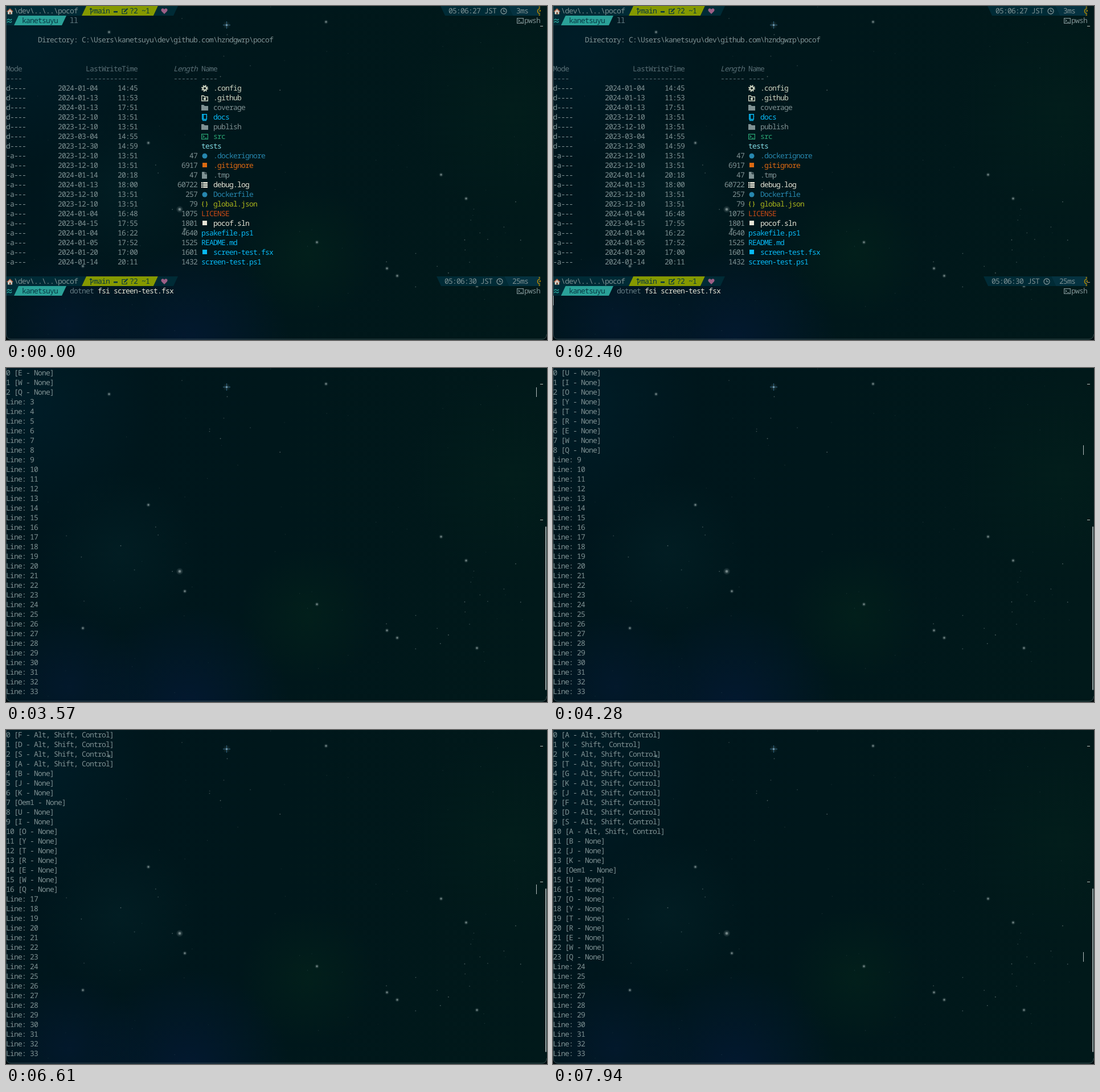
Write an HTML page that moves like this. It is 950x588 px and loops after 8 s.

```html
<!DOCTYPE html>
<html lang="en">
<head>
<meta charset="utf-8">
<title>Terminal key log</title>
<style>
  html, body { margin: 0; width: 100%; height: 100%; overflow: hidden; background: #00151b; }
  svg { display: block; }
  text {
    font: 13px "Noto Sans Mono", "DejaVu Sans Mono", monospace;
    letter-spacing: var(--gap, -.8px);
    text-rendering: geometricPrecision;
    white-space: pre;
  }
  text.slant { font-style: italic; }
</style>
</head>
<body>
<svg id="stage" width="950" height="588" viewBox="0 0 950 588">
  <defs>
    <linearGradient id="sky"><stop stop-color="#00161d"/><stop offset=".5" stop-color="#00171b"/><stop offset="1" stop-color="#01191a"/></linearGradient>
  </defs>
  <rect width="950" height="588" fill="url(#sky)"/>
  <g id="space"></g>
  <g id="list"></g>
  <g id="lines"></g>
  <g id="marks"></g>
  <rect id="bar" x="947" y="279" width="2" height="288" rx="1" fill="#9aa5a5"/>
  <path d="M0 578V588H8Q1 587 0 578M950 578V588H942Q949 587 950 578" fill="#000b0e"/>
  <path d="M.5 0V578Q1 586.5 9 586.5H941Q949 586.5 949.5 578" fill="none" stroke="#5b6a6c" stroke-opacity=".6"/>
  <rect id="caret" width="1" height="17" fill="#b4bebe"/>
  <path id="mouse" d="M1 1V32L8 26 13 37 18 35 13.500 24H24Z" fill="#002b36" stroke="#fff" stroke-width="2"/>
</svg>
<script>
const CELL = 7, ROW = 17, LOOP = 8000;
const DARK = '#073642', SEG = '#002b36', DIM = '#586e75', BACK = '#00171b';
const tint = {
  grey: '#7f9193', pale: '#e6e4d6', sage: '#cfd5c2', cyan: '#08b9f5', blue: '#2787ae',
  green: '#2aa574', aqua: '#83dbe4', orange: '#dc6a12', olive: '#aab41c', red: '#cb4b16'
};
const $ = id => document.getElementById(id);

const text = (col, row, str, fill = tint.grey, extra = '') =>
  `<text x="${col * CELL}" y="${row * ROW + 13}" fill="${fill}" ${extra}>${str}</text>`;
const line = (d, color, width = 1.2) =>
  `<path d="${d}" fill="none" stroke="${color}" stroke-width="${width}"/>`;
const area = (d, color) => `<path d="${d}" fill="${color}"/>`;
const dot = (x, y, r, color, alpha = 1) =>
  `<circle cx="${x}" cy="${y}" r="${r}" fill="${color}" opacity="${alpha}"/>`;
const ring = (r, color, extra) =>
  `<circle cx="6" cy="6" r="${r}" fill="none" stroke="${color}" ${extra}/>`;
const at = (x, y, body) => `<g transform="translate(${x} ${y})">${body}</g>`;

// powerline segment, leaning left (/) or right (\) at each end
const slant = (x0, x1, color, lean = 8, tail = lean) =>
  area(`M${x0 + Math.max(lean, 0)} 0H${x1}L${x1 - tail} 17H${x0 + Math.max(-lean, 0)}Z`, color);

// ---- night sky ----
const glows = [
  [110, 560, 130, '#0b2060', .22], [320, 600, 180, '#081c58', .34],
  [530, 435, 120, '#07351a', .26], [200, 325, 140, '#0a3f44', .16],
  [40, 60, 220, '#002c40', .3], [890, 190, 180, '#06301f', .18]
];
const brightStars = [
  [305, 358], [314, 393], [250, 241], [181, 46], [562, 28], [135, 458],
  [546, 416], [669, 462], [687, 475], [827, 493], [808, 339], [764, 297]
];
const clusters = [[400, 95], [215, 340], [730, 430], [830, 400]];

function drawSpace() {
  let defs = '', out = '', seed = 7;
  const rand = () => (seed = seed * 16807 % 2147483647) / 2147483647;
  const spread = size => (rand() + rand() - 1) * size;
  const glow = (id, color, alpha) =>
    `<radialGradient id="${id}"><stop stop-color="${color}" stop-opacity="${alpha}"/>` +
    `<stop offset="1" stop-color="${color}" stop-opacity="0"/></radialGradient>`;
  glows.forEach(([x, y, r, color, alpha], i) => {
    defs += glow('glow' + i, color, alpha);
    out += dot(x, y, r, `url(#glow${i})`);
  });
  defs += glow('halo', '#a0b2b2', .6);
  for (let i = 0; i < 60; i++)
    out += dot(rand() * 950, rand() * 580, .7, '#6d8688', .12 + rand() * .18);
  for (const [x, y] of clusters)
    for (let i = 0; i < 8; i++)
      out += dot(x + spread(110), y + spread(90), .9, '#93a3a3', .25 + rand() * .25);
  brightStars.forEach(([x, y], i) => {
    const r = i ? 2 : 3.2;
    out += dot(x, y, r * 2, 'url(#halo)', .8) + dot(x, y, r * .7, '#93a3a3', .6);
  });
  out += dot(387.500, 33.500, 7, 'url(#halo)', .4) +
    line('M387.500 27V40M381 33.500H394', '#2b607f', 1) + dot(387.500, 33.500, 1.6, '#7fa5b8');
  $('space').innerHTML = `<defs>${defs}</defs>` + out;
}

// ---- icons, drawn in a 12 x 12 box ----
const icons = {
  gear: c => ring(3.2, c, 'stroke-width="2.2"') + ring(5, c, 'stroke-width="2" stroke-dasharray="2 1.93"'),
  folder: c => area('M0 1H4L6 3H12V11H0Z', c),
  repo: c => line('M.7 2H4L6 4H11.300V11H.7Z', c, 1.4) + dot(6, 7.500, 2.2, c),
  book: c => line('M1.700 .7H9.300V9.500H1.700ZM3.500 1V9M2 11.500H9', c, 1.4),
  term: c => line('M.6 1.600H11.400V10.400H.6ZM2.500 4L5 6 2.500 8M6 8.500H9.500', c),
  disc: c => dot(6, 6, 4.5, c),
  square: c => area('M2 1H10V9H2Z', c),
  file: c => area('M1 0H6V4H10V12H1ZM7 0L10 3H7Z', c),
  log: c => area('M0 1H11V3.700H0ZM0 4.700H11V7.400H0ZM0 8.400H11V11H0Z', c) + line('M2.500 1V11', BACK, .8),
  braces: c => line('M4 1.500Q2 1.500 2.500 4T1 6Q2.500 6 2.500 8T4 10.500M8 1.500Q10 1.500 9.500 4T11 6Q9.500 6 9.500 8T8 10.500', c),
  clock: c => ring(5, c, 'stroke-width="1.3"') + line('M6 3V6.500H9', c),
  house: () => area('M2 6L6 2.500 10 6V11.500H2Z', '#cfc8be') + line('M.7 7L6 2 11.300 7', '#b4593a', 1.5) + area('M5 8H7.500V11.500H5Z', '#7a4a30'),
  heart: c => area('M6 11L1 6Q-.5 3 2 1.500 4.500 .5 6 3 7.500 .5 10 1.500 12.500 3 11 6Z', c),
  edit: c => line('M7 2.500H1V10.500H9V7', c) + line('M4.500 7.500L10.500 1.500', c, 2.2),
  branch: c => line('M2 1V12M2 8Q6 8 6 3M0 3L2 1 4 3', c),
  waves: c => line('M1 5Q3 2 5 4T9 3M1 9Q3 6 5 8T9 7', c, 1.6),
  watch: c => line('M10 1.500A4.500 4.500 0 0 0 10 10.500M7.500 -1H10M7.500 13H10M10 4V6H8.500', c, 1.6)
};
const icon = (name, x, row, color) => at(x, row * ROW + 3, icons[name](color));

// ---- directory listing ----
function prompt(row, clock, took, command) {
  const shift = took.length - 3, x = 763 - shift * CELL;
  const top = slant(-8, 141, SEG) + slant(133, 267, '#859900') + slant(259, 302, SEG) +
    slant(x, x + 119, SEG, -8) + slant(x + 119, 938, '#053240', -8, 0);
  const below = slant(-8, 22, SEG) + slant(14, 106, '#2aa198');
  return at(0, row * ROW, top) + at(0, row * ROW + ROW, below) +
    icon('house', 1, row) + text(2, row, '\\dev\\..\\..\\pocof') +
    icon('branch', 147, row, DARK) + text(22, row, 'main', DARK) +
    at(189, row * ROW + 9, area('M0 0H7V2.500H0Z', DARK)) +
    icon('edit', 203, row, DARK) + text(31, row, '?2 ~1', DARK) +
    icon('heart', 272, row, '#9c5f86') +
    text(111 - shift, row, clock + ' JST') + icon('clock', x + 105, row, tint.grey) +
    text(128 - shift, row, took) + icon('watch', 928, row, '#b58900') +
    icon('waves', 1, row + 1, '#2aa198') + text(4, row + 1, 'kanetsuyu', DARK) +
    command + icon('term', 897, row + 1, tint.grey) + text(130, row + 1, 'pwsh');
}

// date, time, size (- for a directory), name, tint, icon
const files = `
2024-01-04 14:45 - .config sage gear
2024-01-13 11:53 - .github sage repo
2024-01-13 17:51 - coverage grey folder
2023-12-10 13:51 - docs cyan book
2023-12-10 13:51 - publish grey folder
2023-03-04 14:55 - src green term
2023-12-30 14:59 - tests aqua
2023-12-10 13:51 47 .dockerignore blue disc
2023-12-10 13:51 6917 .gitignore orange square
2024-01-14 20:18 47 .tmp grey file
2024-01-13 18:00 60722 debug.log pale log
2023-12-10 13:51 257 Dockerfile blue disc
2023-12-10 13:51 79 global.json olive braces
2024-01-04 16:48 1075 LICENSE red
2023-04-15 17:55 1801 pocof.sln pale square
2024-01-04 16:22 4640 psakefile.ps1 cyan
2024-01-05 17:52 1525 README.md cyan
2024-01-20 17:00 1601 screen-test.fsx cyan square
2024-01-14 20:11 1432 screen-test.ps1 cyan`.trim().split('\n').map(f => f.split(' '));

function drawList() {
  let out = prompt(0, '05:06:27', '3ms', text(16, 1, 'll', '#657b83')) +
    text(8, 3, 'Directory: C:\\Users\\kanetsuyu\\dev\\github.com\\hzndgwrp\\pocof');
  [[0, 'Mode'], [20, 'LastWriteTime'], [42, 'Length'], [49, 'Name']].forEach(([col, name]) => {
    out += text(col, 6, name, DIM, name === 'Length' ? 'class="slant"' : '') +
      text(col, 7, '-'.repeat(name.length), DIM);
  });
  files.forEach(([date, time, size, name, color, pic], i) => {
    const row = 8 + i, dir = size === '-';
    out += text(0, row, dir ? 'd----' : '-a---') + text(13, row, date) + text(28, row, time) +
      (dir ? '' : text(48 - size.length, row, size)) +
      text(pic ? 52 : 49, row, name, tint[color]) + (pic ? icon(pic, 343, row, tint[color]) : '');
  });
  $('list').innerHTML = out + prompt(28, '05:06:30', '25ms',
    text(16, 29, 'dotnet', '#657b83') + text(23, 29, 'fsi screen-test.fsx', tint.pale));
}

// ---- key log ----
const ALL = 'Alt, Shift, Control';
const keys = [
  ...'Q W E R T Y O I U Oem1 K J B'.split(' ').map(k => [k, 'None']),
  ...[...'ASDFJKGTK'].map(k => [k, ALL]),
  ['K', 'Shift, Control'], ['A', ALL]
];
// keys come in quick rolls: start, number of keys, duration
const pressed = [
  [3490, 3, 80], [3890, 3, 90], [4220, 3, 60], [4590, 3, 80], [4990, 1], [6460, 4, 150],
  [6840, 2, 0], [6990, 1], [7390, 1], [7540, 1], [7780, 1], [7940, 1]
].flatMap(([start, n, span]) =>
  Array.from({ length: n }, (_, i) => start + (i && span * i / (n - 1))));

const FOCUS = 470, ENTER = 1230, WAIT = 1310, START = 2950, READY = 3030, BLINK = 540;
const wakes = [FOCUS, WAIT, START, 5920, ...pressed];   // the caret starts a new blink

const rows = [];
let shown = -1, lastMarks;

function fillLines(count) {
  if (count === shown) return;
  shown = count;
  rows.forEach((el, i) => {
    const key = keys[count - 1 - i];
    el.textContent = key ? `${i} [${key.join(' - ')}]` : 'Line: ' + i;
  });
}

function caretPlace(t, count) {
  if (t >= START) return [931, count ? count - 1 : 33];
  return t < WAIT ? [294, 29] : [0, 30];
}

const show = (id, on) => $(id).style.display = on ? '' : 'none';
const mark = (y, color = '#b9bfb8') => `<rect x="938" y="${y}" width="5" height="1" fill="${color}"/>`;

function render() {
  const t = performance.now() % LOOP;
  const count = pressed.filter(time => time <= t).length;
  show('list', t < START);
  show('lines', t >= START);
  show('bar', t >= READY);
  fillLines(count);

  const marks = t >= READY ? mark(28) + mark(267)
    : mark(35) + (t >= ENTER ? mark(486, '#b59a80') : '');
  if (marks !== lastMarks) $('marks').innerHTML = lastMarks = marks;

  const woke = Math.max(...wakes.filter(time => time <= t));
  show('caret', t >= FOCUS && (t - woke) % (2 * BLINK) < BLINK);
  const [x, row] = caretPlace(t, count);
  $('caret').setAttribute('x', x);
  $('caret').setAttribute('y', row * ROW);

  // the pointer glides in from the right and hides on Enter
  show('mouse', t >= 70 && t < ENTER);
  const left = (1 - Math.min(1, Math.max(0, (t - 70) / FOCUS))) ** 2;
  $('mouse').setAttribute('transform', `translate(${768 + 170 * left} ${379 - 233 * left})`);
  requestAnimationFrame(render);
}

// letter gap that puts one glyph in each cell
$('lines').innerHTML = text(0, 0, 'm'.repeat(100), tint.grey, 'style="letter-spacing:0"');
const advance = $('lines').firstChild.getComputedTextLength() / 100;
$('stage').style.setProperty('--gap', CELL - advance + 'px');

$('lines').innerHTML = Array.from({ length: 34 }, (_, i) => text(0, i, '')).join('');
rows.push(...$('lines').children);
drawSpace();
drawList();
render();
</script>
</body>
</html>
```
